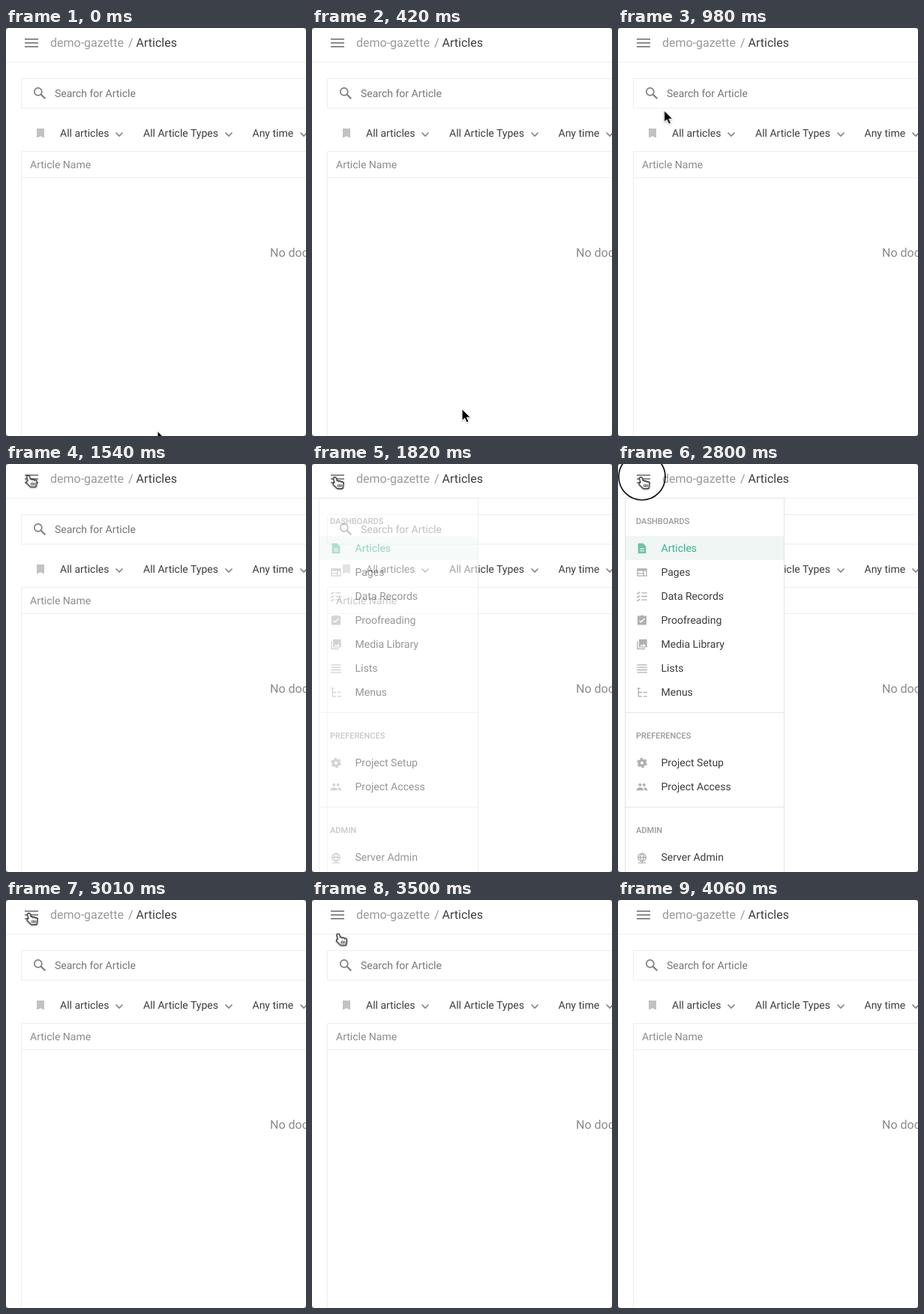
An HTML page for the animation above (4.27 s loop, 400 by 544 pixels).

```html
<!DOCTYPE html>
<html lang="en">
<head>
<meta charset="utf-8">
<title>Navigation menu</title>
<style>
  html, body { margin: 0; width: 100%; height: 100%; overflow: hidden; background: #777; }
  svg { display: block; font: 14px Roboto, sans-serif; text-rendering: geometricPrecision; }
  .line { fill: none; stroke: #ededed; }
  .grey { fill: #8b8b8b; }
  .dark { fill: #3c3c3c; }
  .title { font-size: 16px; }
  .section { font-size: 11px; font-weight: 500; fill: #999; }
  .icon { fill: #b0b0b0; fill-rule: evenodd; }
  .icon .stroke { fill: none; stroke: #b0b0b0; stroke-width: 2; }
  .active .icon { fill: #72c1aa; }
  .active text { fill: #3aad8d; }
  .chevron { fill: none; stroke: #858585; stroke-width: 1.7; }
  #hand { stroke-linejoin: round; stroke-linecap: round; }
</style>
</head>
<body>
<svg width="400" height="544" viewBox="0 0 400 544">
  <defs>
    <clipPath id="window"><rect width="400" height="544" rx="4"/></clipPath>
    <filter id="soft" x="-50%" y="-50%" width="200%" height="200%">
      <feDropShadow dx="0" dy="1" stdDeviation="1" flood-opacity=".3"/>
    </filter>
    <path id="fingers" d="M0 1.5 2.5 10M3.5 6 4 10M6.500 6.500 7 10M9.500 7.500V10L9 13H4L-.5 8.500 4 10H9V13"/>
  </defs>
  <g clip-path="url(#window)">
    <rect width="400" height="544" fill="#fff"/>

    <g id="page">
      <path class="line" d="M0 45.500H400"/>
      <path d="M25 14.800H43M25 19.800H43M25 24.800H43" stroke="#7c7c7c" stroke-width="1.700"/>
      <text class="title" x="59" y="25" fill="#999">demo-gazette</text>
      <text class="title" x="163" y="25" fill="#999">/</text>
      <text class="title dark" x="173.500" y="25">Articles</text>

      <path class="line" d="M400 67.500H20.500V107H400"/>
      <g fill="none" stroke="#808080">
        <circle cx="42.800" cy="84.900" r="5" stroke-width="1.700"/>
        <path d="M46.500 88.500 52.300 94.300" stroke-width="2.200"/>
      </g>
      <text x="65" y="92" fill="#757575">Search for Article</text>

      <path d="M41 134h10v12.500l-5-2.300-5 2.300z" fill="#c2c2c2"/>
      <text class="dark" x="72" y="145">All articles</text>
      <text class="dark" x="183" y="145">All Article Types</text>
      <text class="dark" x="328.500" y="145">Any time</text>

      <path class="line" d="M400 164.500H20.500V544M21 199.500H400"/>
      <text class="grey" x="32" y="187">Article Name</text>
      <text class="title grey" x="352" y="305">No documents</text>
    </g>

    <g id="menu">
      <rect x="9.500" y="45.500" width="212" height="510" fill="#fff" stroke="#e4e4e4"/>
      <path d="M10 331.500H221M10 457.500H221" stroke="#e6e6e6"/>
    </g>

    <circle id="ring" fill="none" stroke="#111" stroke-width="1.700"/>
    <g id="cursor" filter="url(#soft)">
      <path id="arrow" stroke="#fff" stroke-linejoin="round"
        d="M0 0V15.500L3.600 12.200 6.100 18 8.900 16.800 6.400 11.200H11.200z"/>
      <g id="hand">
        <use href="#fingers" stroke="#111" stroke-width="5"/>
        <use href="#fingers" fill="#fff" stroke="#fff" stroke-width="2.700"/>
        <path d="M4.200 9.500V12.500M6.500 9.500V12.500M8.800 9.500V12.500" stroke="#111"/>
      </g>
    </g>
  </g>
</svg>
<script>
const LOOP = 4270, STEP = 70;
const byId = id => document.getElementById(id);
const draw = (parent, markup) => parent.insertAdjacentHTML('beforeend', markup);

for (const x of [151, 297, 397])
  draw(byId('page'), `<path class="chevron" d="M${x - 4.5} 139.500l4.500 4.500 4.500-4.500"/>`);

// Menu icons on a 24 unit grid.
const stroke = d => `<path class="stroke" d="${d}"/>`;
const solid = d => `<path d="${d}"/>`;
const disc = (x, y, r) => `<circle cx="${x}" cy="${y}" r="${r}"/>`;
const hoop = (r, width, dash = 'none') =>
  `<circle class="stroke" cx="12" cy="12" r="${r}" style="stroke-width:${width}" stroke-dasharray="${dash}"/>`;
const tick = y => `M2 ${y}l2 2 4-4M11 ${y}H22`;
const icons = {
  doc: solid('M4 2H14L20 8V22H4zM8 12V14H16V12zM8 16V18H16V16z'),
  page: solid('M2 4H22V20H2zM4 9V13H14V9zM4 15V18H14V15zM16 9V18H20V9z'),
  checks: stroke([5, 12, 19].map(tick).join('')),
  board: solid('M3 3H9L12 1 15 3H21V21H3zM6 13L10 17 18 9 16.500 7.500 10 14 7.500 11.500z'),
  photos: solid('M6 2H22V18H6zM8 16H20L16 11 13 15 11 12zM2 6H4V20H18V22H2z'),
  lines: stroke([5, 10, 15, 20].map(y => `M2 ${y}H22`).join('')),
  tree: stroke('M2 4H9M5 4V20H12M5 12H12M15 12H22M15 20H22'),
  gear: hoop(5.5, 5) + hoop(8.5, 3.5, '5 3.900'),
  people: disc(8, 8, 3) + disc(16, 8, 3) + solid('M1 19Q1 13 8 13T15 19zM17 19Q17 15 15 13 23 13 23 19z'),
  globe: hoop(8, 2) + stroke('M4 12H20M12 4Q5 12 12 20 19 12 12 4M12 20V23M4 23H20')
};

const sections = [
  [76, 'DASHBOARDS', { doc: 'Articles', page: 'Pages', checks: 'Data Records', board: 'Proofreading',
    photos: 'Media Library', lines: 'Lists', tree: 'Menus' }],
  [362, 'PREFERENCES', { gear: 'Project Setup', people: 'Project Access' }],
  [488, 'ADMIN', { globe: 'Server Admin' }]
];
for (const [top, title, items] of sections) {
  draw(byId('menu'), `<text class="section" x="24" y="${top + 4}">${title}</text>`);
  Object.entries(items).forEach(([icon, label], i) => {
    const y = top + 36 + 32 * i;
    const active = label === 'Articles';
    draw(byId('menu'), `<g class="${active ? 'active' : ''}">
      ${active ? `<rect x="10" y="${y - 16}" width="211" height="32" fill="#eff6f4"/>` : ''}
      <g class="icon" transform="translate(24 ${y - 7.5}) scale(.667)">${icons[icon]}</g>
      <text class="dark" x="57.500" y="${y + 5}">${label}</text></g>`);
  });
}

const clamp = u => Math.min(1, Math.max(0, u));
const smooth = u => u * u * (3 - 2 * u);
const within = (t, start, end) => t >= start && t < end;

// The pointer glides from rest to rest; bend delays x against y.
const start = { x: 202, y: 537.5 };
const glides = [
  { from: 0, to: 280, x: 200, y: 508 },
  { from: 560, to: 1155, x: 25, y: 5 },
  { from: 1155, to: 1680, x: 30.5, y: 18 },
  { from: 3420, to: 3990, x: 228, y: 531, bend: 1.3 }
];
function pointerAt(t) {
  let { x, y } = start;
  for (const { from, to, bend = 1, ...end } of glides) {
    const s = smooth(clamp((t - from) / (to - from)));
    x += (end.x - x) * s ** bend;
    y += (end.y - y) * s;
  }
  return { x, y };
}

const clicks = [
  { from: 280, to: 420, x: 201, y: 509, r: 22 },
  { from: 1610, to: 1750, x: 32, y: 17, r: 31 },
  { from: 2800, to: 3010, x: 32, y: 17, r: 31 }
];
function ringAt(t) {
  const click = clicks.find(({ from, to }) => within(t, from, to));
  const { x, y, r } = click || clicks[0];
  return { opacity: click ? 1 : 0, cx: `${x}px`, cy: `${y}px`, r: `${r}px` };
}

const overLink = t => within(t, 1120, 3570);
const menuOpacity = t => within(t, 1750, 3010) ? 1 - (1 - clamp((t - 1680) / 350)) ** 1.5 : 0;

function play(id, poseAt) {
  const frames = [];
  for (let t = 0; t < LOOP; t += STEP)
    frames.push({ offset: t / LOOP, easing: 'steps(1, end)', ...poseAt(t) });
  frames.push({ ...frames.at(-1), offset: 1 });
  byId(id).animate(frames, { duration: LOOP, iterations: Infinity });
}

play('cursor', t => {
  const { x, y } = pointerAt(t);
  return { transform: `translate(${x}px, ${y}px)`, opacity: t < 4060 ? 1 : 0 };
});
play('arrow', t => ({ opacity: overLink(t) ? 0 : 1 }));
play('hand', t => ({ opacity: overLink(t) ? 1 : 0 }));
play('ring', ringAt);
play('menu', t => ({ opacity: menuOpacity(t) }));
</script>
</body>
</html>
```
